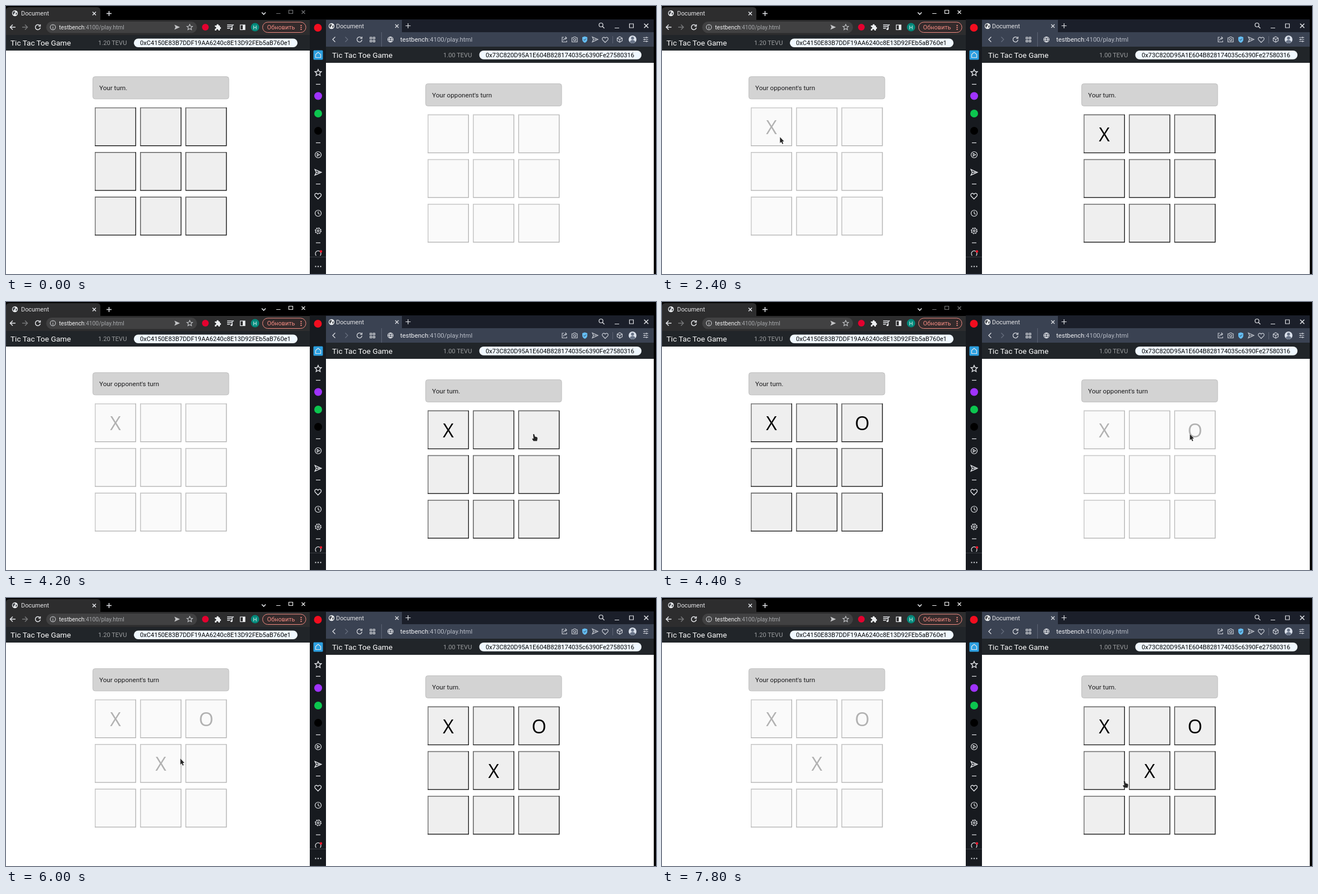
Animation, 1164 px wide and 481 px high, one loop 8000 ms. Source, as an HTML page:

```html
<!DOCTYPE html>
<html lang="en">
<head>
<meta charset="utf-8">
<title>Two player board</title>
<style>
html, body { margin: 0; width: 100%; height: 100%; overflow: hidden; background: #000; }
svg { display: block; }
text { font-family: Roboto, "Open Sans", sans-serif; font-size: 11.7px; fill: #1b1b1d; white-space: pre; }
.line { fill: none; stroke: #e4e6ea; stroke-width: 1.2; }
.tab { font-size: 10.9px; fill: #e6e6e8; }
.brand { font-size: 13.6px; fill: #fff; }
.coins { font-size: 11.1px; fill: #9b9d9f; }
.wallet { font-size: 11.2px; fill: #000; }
.mark { font: 34px "Open Sans", "Noto Sans", sans-serif; text-anchor: middle; }
.on { --low: #1c1c1c; --high: #767676; --face: #efefef; --ink: #000; }
.off { --low: #b6b6b6; --high: #cacaca; --face: #fafafa; --ink: #b1b1b1; }
.low { fill: var(--low); }
.high { fill: var(--high); }
.face { fill: var(--face); }
.mark { fill: var(--ink); }
#cursor path { fill: #262626; stroke: #fff; stroke-width: .8; paint-order: stroke; }
</style>
</head>
<body>
<svg id="stage" width="1164" height="481" viewBox="0 0 1164 481">
<defs>
  <path id="back" d="M5 0H-4.5M0-4.5L-4.5 0 0 4.5"/>
  <path id="chevron" d="M2.5-4.5L-2 0 2.5 4.5"/>
  <path id="reload" d="M3.2-3.2A4.5 4.5 0 1 0 4.5 .7M4.5-5V-1.8H1.2"/>
  <path id="cross" d="M-3-3L3 3M3-3L-3 3"/>
  <path id="plus" d="M-4.5 0H4.5M0-4.5V4.5"/>
  <path id="plane" d="M-5-4.5L5 0-5 4.5-3 0ZM-3 0H2"/>
  <path id="star" d="M0-5L1.5-1.7 5-1.4 2.4 1 3.2 4.6 0 2.8-3.2 4.6-2.4 1-5-1.4-1.5-1.7Z"/>
  <path id="heart" d="M0 5L-4.6 .3C-7-3-2.6-6.4 0-2.8 2.6-6.4 7-3 4.6 .3Z"/>
  <g id="globe"><circle r="4.7"/><path d="M-4.7 0H4.7M0-4.7Q-4.4 0 0 4.7Q4.4 0 0-4.7"/></g>
  <g id="earth"><circle r="5.2" fill="#eceef0"/><path d="M-4-2L-1-4 1-2-1 0-2 3-4 1ZM2-1L4-1 3 3 1 2Z" fill="#4a4d52"/></g>
  <path id="dash" d="M-4 0H4"/>
</defs>

<!-- left window -->
<path d="M0 25V8Q0 2 6 2H163Q169 2 169 8V25H544V52H0Z" fill="#2d2d2e"/>
<rect x="72" y="28" width="270" height="20.5" rx="10.2" fill="#414142"/>
<rect y="52" width="544" height="28" fill="#212529"/>
<rect y="80" width="544" height="401" fill="#fff"/>
<use href="#earth" x="16" y="13"/>
<text class="tab" x="27" y="17">Document</text>
<g class="line" style="stroke-width:1.5">
  <use href="#cross" x="158" y="13.5"/>
  <use href="#plus" x="184.500" y="13.500"/>
  <use href="#back" x="12" y="38"/>
  <use href="#back" transform="translate(34 38) scale(-1 1)" stroke="#77787a"/>
  <use href="#reload" x="57" y="38"/>
</g>
<path class="line" d="M458 11.500L461.500 15 465 11.500" style="stroke-width:1.6"/>
<g id="buttons" class="line"><path d="M484 13.500H491.500M506.500 7.500H513.500V13.500H506.500Z"/><use href="#cross" x="532.500" y="11"/></g>
<g class="line" style="stroke:#bfc1c4">
  <circle cx="84" cy="38" r="4.700"/><path d="M84 37.500V41M84 35V36"/>
  <use href="#star" x="329" y="38"/>
</g>
<use href="#plane" x="306.500" y="38" fill="#c3c4c6"/>
<text x="95" y="42" style="font-size:10.3px;fill:#a6a8ab"><tspan fill="#f0f0f1">testbench</tspan>:4100/play.html</text>
<circle cx="357" cy="38" r="6" fill="#e4002f"/>
<path d="M374 35H377Q377 32.500 379 32.500T381 35H383V37.500Q385 37.500 385 39.500T383 41.500V44H380.500Q380.500 41.500 378.500 41.500T376.500 44H374V41Q376.500 41 376.500 39T374 37Z" fill="#eceef0"/>
<path class="line" d="M396 34H404M396 37H404M396 40H401M405 42V34H408" style="stroke-width:1.5"/>
<circle cx="403.700" cy="41.500" r="1.800" fill="#eceef0"/>
<rect class="line" x="419.500" y="34" width="8.500" height="8.500"/>
<path d="M424 34H428V42.500H424Z" fill="#eceef0"/>
<circle cx="446" cy="38" r="7.500" fill="#00897b"/>
<text x="446" y="41.500" text-anchor="middle" style="font-size:9.5px;fill:#fff">H</text>
<rect x="459.500" y="29" width="77.500" height="18.500" rx="9.200" fill="#332a2b" stroke="#f28b82"/>
<text x="467.500" y="42" style="font-size:11px;fill:#f28b82">Обновить</text>
<path d="M528.500 34V43" stroke="#f28b82" stroke-width="2" stroke-dasharray="2 1.500"/>
<text class="brand" x="8" y="71">Tic Tac Toe Game</text>
<text class="coins" x="165" y="70.200">1.20 TEVU</text>
<rect x="229" y="58.500" width="293" height="15.500" rx="7.700" fill="#f0f8ff"/>
<text class="wallet" x="240" y="70.300">0xC4150E83B7DDF19AA6240c8E13D92FEb5aB760e1</text>

<!-- side bar -->
<rect x="544" y="24" width="29" height="457" fill="#171a1f"/>
<circle cx="558.500" cy="39" r="7" fill="#f20d1f"/>
<rect x="550.500" y="79.500" width="17" height="17" rx="1.500" fill="#2c9fe0"/>
<circle cx="559" cy="161.500" r="7" fill="#a033ff"/>
<circle cx="559" cy="193" r="7" fill="#0cc64f"/>
<circle cx="559" cy="224" r="7" fill="#000"/>
<g class="line">
  <path d="M554.500 87L559 83 563.500 87V92.500H554.500Z"/>
  <use href="#star" transform="translate(559 119.500) scale(1.150)"/>
  <use href="#dash" x="559" y="140.500"/><use href="#dash" x="559" y="245.500"/>
  <use href="#dash" x="559" y="319.500"/><use href="#dash" x="559" y="425"/>
  <circle cx="559" cy="267" r="5.500"/><path d="M557.300 264.500L561.500 267 557.300 269.500Z"/>
  <use href="#plane" transform="translate(559 298.500) scale(1.150)"/>
  <use href="#heart" transform="translate(558.700 341) scale(1.100)"/>
  <circle cx="559" cy="372" r="5.500"/><path d="M559 368.500V372L561.500 374"/>
  <circle cx="559" cy="403.500" r="4.500"/><circle cx="559" cy="403.500" r="1.700"/>
  <circle cx="559" cy="403.500" r="5.400" stroke-dasharray="2 2.240"/>
  <path d="M555.500 448A5 5 0 1 1 562.500 448"/>
  <path d="M553.500 467.500H565" stroke-width="2" stroke-dasharray="2 2.500"/>
</g>
<circle cx="564" cy="440.500" r="2.200" fill="#f5152a"/>
<path d="M544 450.500H573" stroke="#3b3e44"/>

<!-- right window -->
<rect x="573" y="24" width="587" height="23" fill="#1b1f2a"/>
<path d="M573 25H709V47H1160V73H573Z" fill="#3a4252"/>
<rect x="573" y="73" width="587" height="29" fill="#212529"/>
<rect x="573" y="102" width="587" height="379" fill="#fff"/>
<use href="#earth" x="583" y="36"/>
<text class="tab" x="591" y="40">Document</text>
<g class="line">
  <use href="#cross" x="700" y="36"/><use href="#plus" x="720" y="35.500"/>
  <circle cx="1065.500" cy="34" r="3.500"/><path d="M1068 36.500L1071.500 40"/>
  <path d="M1090 39.500H1098M1116.500 32H1123.500V39H1116.500Z"/>
  <use href="#cross" transform="translate(1146.500 35.500) scale(1.250)"/>
  <use href="#chevron" x="587" y="60"/>
  <use href="#chevron" transform="translate(610 60) scale(-1 1)" stroke="#697181"/>
  <use href="#reload" x="633" y="60"/>
  <path d="M652 56H655V59H652ZM657.500 56H660.500V59H657.500ZM652 61.500H655V64.500H652ZM657.500 61.500H660.500V64.500H657.500Z"/>
  <path d="M672.500 47V73M1086.500 54V67" stroke="#596171"/>
  <use href="#globe" x="688.500" y="60"/>
</g>
<text x="706" y="64" style="font-size:11.4px;fill:#b7bcc6"><tspan fill="#f1f2f5">testbench</tspan>:4100/play.html</text>
<g class="line" style="stroke:#c8ccd4">
  <path d="M999 56H996V64.500H1004V62M998.500 62Q999 57.500 1004 57.500M1001.500 55L1004 57.500 1001.500 60"/>
  <path d="M1013.500 57H1016L1017 55.500H1020L1021 57H1023V64.500H1013.500Z"/><circle cx="1018.300" cy="60.500" r="2"/>
  <use href="#plane" x="1055" y="60"/><use href="#heart" x="1073" y="60.500"/>
  <path d="M1099 55L1103.500 57.500V62.500L1099 65 1094.500 62.500V57.500ZM1094.500 57.500L1099 60 1103.500 57.500M1099 60V65"/>
  <path d="M1141 56.500H1150M1141 60H1150M1141 63.500H1150M1147 55V58M1143.500 58.500V61.500M1147 62V65"/>
</g>
<path d="M1036.500 54.500L1041 56V60Q1041 64 1036.500 66Q1032 64 1032 60V56Z" fill="#65bdf2"/>
<path d="M1034.500 60L1036 61.500 1039 58.500" fill="none" stroke="#273344"/>
<circle cx="1122" cy="60" r="7" fill="#dce2ec"/>
<path d="M1117 64.800Q1118 61 1122 61T1127 64.800Q1122 69 1117 64.800Z" fill="#687387"/><circle cx="1122" cy="57.700" r="2.700" fill="#687387"/>
<text class="brand" x="584" y="92.800">Tic Tac Toe Game</text>
<text class="coins" x="783" y="92">1.00 TEVU</text>
<rect x="847.500" y="80" width="290.500" height="15.700" rx="7.800" fill="#f0f8ff"/>
<text class="wallet" x="859" y="92">0x73C820D95A1E604B828174035c6390Fe27580316</text>

<g id="boards"></g>
<g id="cursor">
  <path id="arrow" d="M.3 .3V11L2.700 8.800 4.400 12.800 6.200 12 4.500 8.100H7.600Z"/>
  <path id="hand" d="M-1.200 .6Q0-.8 1.100 .6L2.200 4.500 5.800 5.400Q7 6 6.800 8L6 12.400H-.5L-2.800 9Q-2.600 7.500-.2 8.200Z"/>
</g>
</svg>
<script>
const $ = id => document.getElementById(id);
const LOOP = 8000, STEP = 100;
const CELL = { w: 74, h: 69.5, dx: 81.2, dy: 80.2 };

function add(parent, tag, attrs) {
  const node = document.createElementNS(parent.namespaceURI, tag);
  for (const key in attrs) node.setAttribute(key, attrs[key]);
  return parent.appendChild(node);
}

// x, y: top left of the first cell
function makeBoard(x, y) {
  const root = add($("boards"), "g", {});
  add(root, "rect", { x: x - 3.5, y: y - 55.2, width: 243.5, height: 40, rx: 4, fill: "#d3d3d3", stroke: "#bebebe" });
  const status = add(root, "text", { x: x + 8, y: y - 31 });
  const marks = [];
  for (let i = 0; i < 9; i++) {
    const cx = x + i % 3 * CELL.dx, cy = y + Math.floor(i / 3) * CELL.dy;
    const layer = (name, inset, cut) => add(root, "rect", {
      class: name, x: cx + inset, y: cy + inset, width: CELL.w - cut, height: CELL.h - cut
    });
    layer("low", 0, 0);
    layer("high", 0, 1.5);
    layer("face", 1.5, 3);
    marks.push(add(root, "text", { class: "mark", x: cx + CELL.w / 2, y: cy + 47.8 }));
  }
  return { x, y, root, status, marks };
}

const left = makeBoard(159, 182), right = makeBoard(755, 194.7);

// cell, mark, time seen on the left and on the right
const moves = [
  [0, "X", 1600, 1700],
  [2, "O", 4400, 4300],
  [4, "X", 5800, 5900]
];

// time, x, y of the pointer's hot spot; it glides between neighbours
const path = [
  [500, 304, 400], [1100, 211, 232], [1600, 211, 233], [2300, 211, 233], [2400, 211, 235],
  [2600, 211, 235], [2700, 892, 290], [3000, 892, 290], [3600, 807, 306], [3800, 807, 306],
  [4200, 945, 237], [4400, 945, 237], [4700, 702, 268], [4900, 401, 265], [5000, 401, 265],
  [5400, 275, 288], [5600, 282, 289], [5900, 282, 289], [6600, 829, 273], [6800, 807, 315],
  [7100, 802, 306], [7300, 812, 300], [7500, 810, 314], [7800, 828, 328]
];

function pointerAt(t) {
  const next = path.findIndex(p => p[0] > t);
  if (next < 0) return path[path.length - 1].slice(1);
  const [t0, x0, y0] = path[next - 1], [t1, x1, y1] = path[next];
  const u = (t - t0) / (t1 - t0), k = u * u * (3 - 2 * u);
  return [x0 + (x1 - x0) * k, y0 + (y1 - y0) * k];
}

function showBoard(board, side, t) {
  const seen = moves.filter(m => t >= m[2 + side]);
  board.active = seen.length % 2 === side;
  board.root.setAttribute("class", board.active ? "on" : "off");
  board.status.textContent = board.active ? "Your turn." : "Your opponent's turn";
  board.marks.forEach((node, i) => {
    const move = seen.find(m => m[0] === i);
    node.textContent = move ? move[1] : "";
  });
}

function overCell(board, x, y) {
  const u = x - board.x, v = y - board.y;
  return board.active && u >= 0 && v >= 0 && u < 3 * CELL.dx && v < 3 * CELL.dy
    && u % CELL.dx < CELL.w && v % CELL.dy < CELL.h;
}

const show = (node, visible) => node.setAttribute("visibility", visible ? "visible" : "hidden");

function draw(now) {
  const t = Math.floor(now % LOOP / STEP) * STEP;
  showBoard(left, 0, t);
  showBoard(right, 1, t);
  const leftFocused = t >= 1600 && t < 4300 || t >= 5800;
  $("buttons").style.stroke = leftFocused ? "#f4f4f4" : "#77787a";

  const visible = t >= path[0][0];
  const [x, y] = visible ? pointerAt(t) : [0, 0];
  const hand = overCell(left, x, y) || overCell(right, x, y);
  $("cursor").setAttribute("transform", `translate(${Math.round(x)} ${Math.round(y)})`);
  show($("hand"), visible && hand);
  show($("arrow"), visible && !hand);
}

const start = performance.now();
function tick() {
  draw(performance.now() - start);
  requestAnimationFrame(tick);
}
tick();
</script>
</body>
</html>
```
